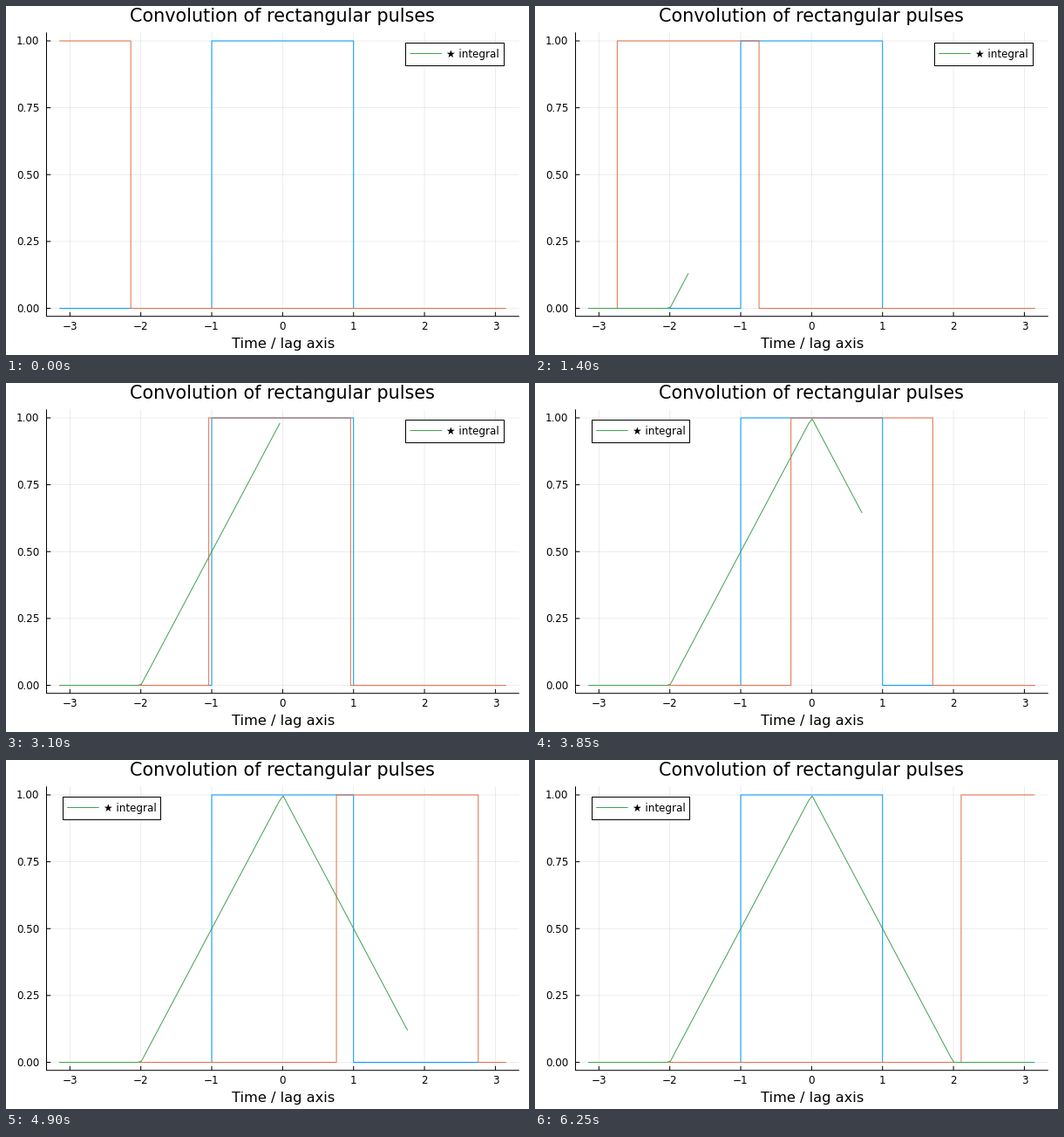
Recreate the animation shown at these times as a matplotlib script. Size 600 by 400 pixels, loop 6300 ms.

```python
import numpy as np
import matplotlib.pyplot as plt
from matplotlib.animation import FuncAnimation
from matplotlib.patches import Rectangle

W, H = 600, 400
PX = 0.72                      # points per pixel at 100 dpi
STEP, FRAMES = 0.05, 126
BLUE, ORANGE, GREEN = "#009afa", "#e36f47", "#3ea44e"
LEFT, RIGHT, TOP, BOTTOM = 46.5, 588.3, 30.8, 355.7

plt.rcParams["font.family"] = "DejaVu Sans"
fig = plt.figure(figsize=(W / 100, H / 100), dpi=100, facecolor="white")
ax = fig.add_axes([0, 0, 1, 1])
ax.set(xlim=(0, W), ylim=(H, 0))
ax.axis("off")


def to_x(t):
    return 317.37 + 81.35 * np.asarray(t)


def to_y(v):
    return 346.5 - 306.5 * np.asarray(v)


def line(xs, ys, color, width=1.0, **kw):
    return ax.plot(xs, ys, color=color, lw=width * PX, snap=False,
                   solid_joinstyle="miter", **kw)[0]


def label(x, y, text, size, ha="center"):
    return ax.text(x, y, text, fontsize=size * PX, ha=ha, va="baseline")


def pulse(center):
    """Corner points of a unit pulse of width 2, cut to [-pi, pi]."""
    a, b = np.clip([center - 1, center + 1], -np.pi, np.pi)
    t, v = [a, b], [1, 1]
    if a > -np.pi:
        t, v = [-np.pi, a] + t, [0, 0] + v
    if b < np.pi:
        t, v = t + [b, np.pi], v + [0, 0]
    return to_x(t), to_y(v)


# grid, ticks and axes
for n in range(-3, 4):
    x = to_x(n)
    line([x, x], [TOP, BOTTOM], "black", 0.7, alpha=0.1)
    line([x, x], [BOTTOM, BOTTOM - 4.8], "black", solid_capstyle="butt")
    label(x, 371.4, str(n).replace("-", "\u2212"), 11.9)
for v in np.linspace(0, 1, 5):
    y = to_y(v)
    line([LEFT, RIGHT], [y, y], "black", 0.7, alpha=0.1)
    line([LEFT, LEFT + 4.8], [y, y], "black", solid_capstyle="butt")
    label(38.2, y + 4.4, f"{v:.2f}", 11.9, "right")
line([LEFT, LEFT, RIGHT], [TOP, BOTTOM, BOTTOM], "black")
label(317.4, 18.3, "Convolution of rectangular pulses", 20.8)
label(317.8, 392.2, "Time / lag axis", 16.3)

line(*pulse(0), BLUE, zorder=3)
moving = line([], [], ORANGE, zorder=4)
integral = line([], [], GREEN, zorder=5)

# legend
box = ax.add_patch(Rectangle((0, 41.5), 112.6, 26, fc="white", ec="black",
                             lw=PX, zorder=6))
sample = line([], [], GREEN, zorder=7, solid_capstyle="butt")
caption = label(0, 59, "\u2605 integral", 11.9, "left")
caption.set_zorder(7)


def update(k):
    lags = -np.pi + STEP * np.arange(k + 1)
    lag = lags[-1]
    moving.set_data(*pulse(lag))
    shown = lags if k else lags[:0]
    integral.set_data(to_x(shown), to_y(np.maximum(0, 1 - np.abs(shown) / 2)))

    # legend hops to the emptier corner
    x = 64.6 if lag > 0.2 else 457.9
    box.set_x(x)
    sample.set_data([x + 5.6, x + 42], [54.5, 54.5])
    caption.set_x(x + 47.3)
    return moving, integral, box, sample, caption


anim = FuncAnimation(fig, update, frames=FRAMES, interval=50,
                     repeat=True, repeat_delay=0, blit=False)
plt.show()
```
